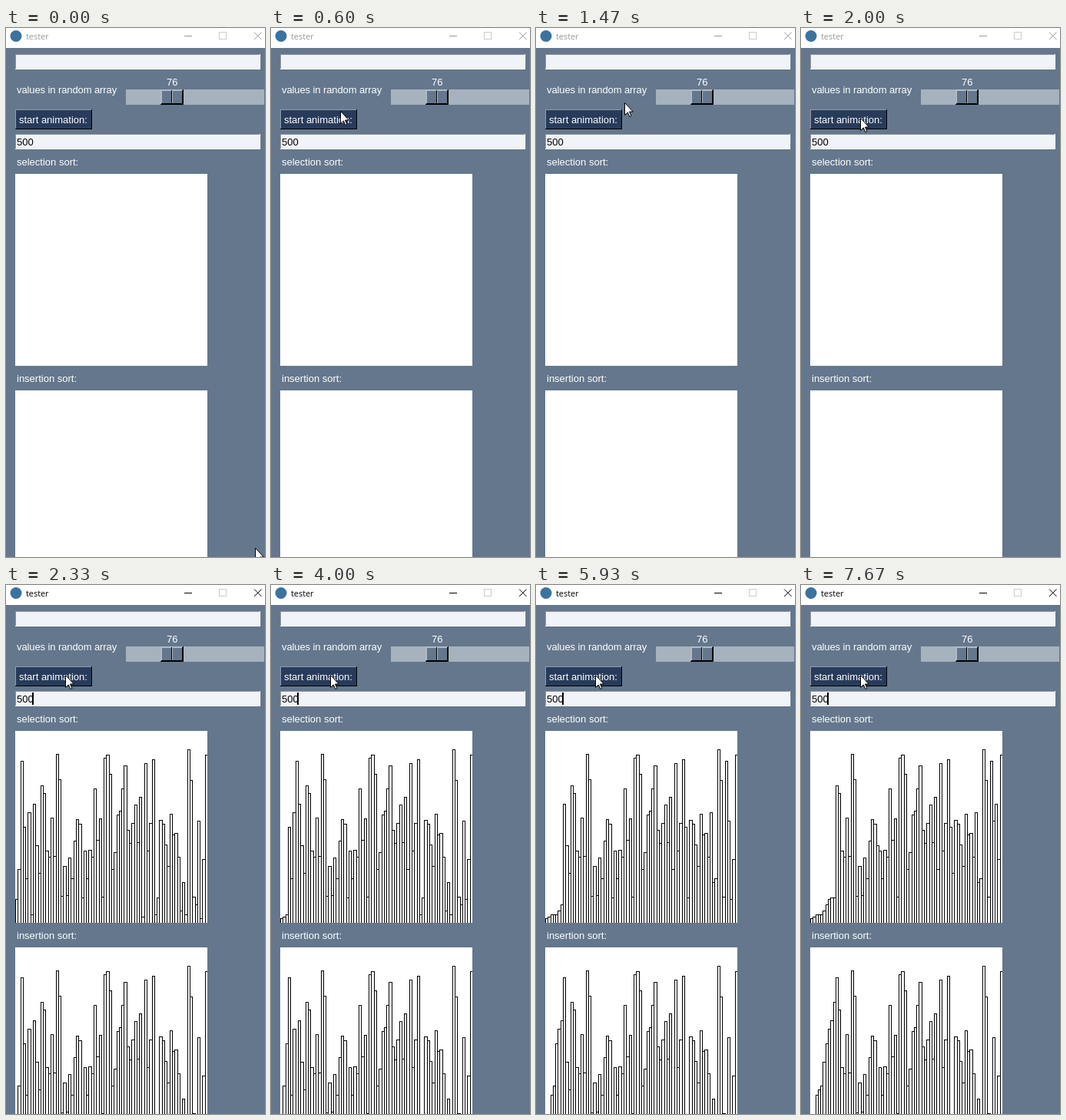
Write an HTML page that moves like this. It is 337x689 px and loops after 8 s.

```html
<!DOCTYPE html>
<html lang="en">
<head>
<meta charset="utf-8">
<title>tester</title>
<style>
  html, body { margin: 0; width: 100%; height: 100%; overflow: hidden; background: #64778d; }
  svg { display: block; }
  text { font: 13px "Liberation Sans", Arial, sans-serif; fill: #fff; white-space: pre; }
  .title { font: 10.9px "Open Sans", "Noto Sans", sans-serif; fill: currentColor; }
  .line { fill: none; stroke: currentColor; }
  .bars { fill: none; stroke: #000; }
  .crisp { shape-rendering: crispEdges; }
</style>
</head>
<body>
<svg id="stage" width="337" height="689" viewBox="0 0 337 689">
  <rect width="337" height="689" fill="#64778d"/>
  <rect width="337" height="26" fill="#fff"/>
  <circle cx="13" cy="10.5" r="7.5" fill="#3b73a0"/>
  <g id="bar">
    <text class="title" x="26" y="15">tester</text>
    <path class="line crisp" d="M232 10.5H242"/>
    <path class="line" d="M323 5.5L332.5 15M332.5 5.5L323 15"/>
  </g>
  <rect class="crisp" x="277.5" y="5.5" width="9" height="9" fill="none" stroke="#ccc"/>

  <g id="widgets" class="crisp"></g>

  <text x="14" y="85" letter-spacing="-0.1">values in random array</text>
  <text x="209" y="75">76</text>
  <text x="17" y="124">start animation:</text>
  <text x="14" y="153" style="fill:#000">500</text>
  <text x="14" y="179">selection sort:</text>
  <text x="14" y="461">insertion sort:</text>
  <rect id="caret" class="crisp" x="34" y="140" width="2" height="16"/>

  <svg x="12" y="190" width="250" height="250">
    <rect width="250" height="250" fill="#fff"/>
    <path id="selection" class="bars crisp"/>
  </svg>
  <svg x="12" y="472" width="250" height="250">
    <rect width="250" height="250" fill="#fff"/>
    <path id="insertion" class="bars crisp"/>
  </svg>

  <path id="cursor" d="M.5 .5V16.5L4.3 12.9L6.8 18.5L8.9 17.6L6.5 12H11.3Z" fill="#fff" stroke="#000"/>
</svg>
<script>
const LOOP = 8000, TICK = 200 / 3, FLOOR = 440, SIZE = 250;
const $ = id => document.getElementById(id);

// Top edge of each bar before sorting
const tops = [
  409, 370, 229, 315, 382, 296, 429, 285, 339, 375, 261, 271, 346, 354, 303, 353, 220, 253, 405,
  366, 404, 355, 382, 333, 305, 311, 407, 346, 382, 345, 354, 265, 332, 304, 406, 225, 221, 246,
  370, 348, 299, 294, 265, 235, 319, 336, 310, 286, 335, 276, 432, 232, 346, 310, 227, 429, 407,
  306, 311, 338, 366, 298, 325, 323, 354, 424, 387, 429, 214, 254, 406, 416, 307, 434, 357, 221
];
const activeAt = 2200, barsAt = 2330;
const sortTimes = [2870, 3330, 3870, 4400, 4870, 5470, 5930, 6470, 7000, 7530];
const blinkTimes = [2200, 2870, 3130, 3730, 4000, 4670, 4930, 5530, 5870, 6470, 6730, 7330, 7670];

// Pointer path: time, x, y
const path = [
  [0, 324, 677], [133, 324, 677], [200, 322, 650], [333, 270, 420], [467, 170, 205],
  [600, 90, 108], [667, 81, 97], [733, 84, 92], [867, 140, 98], [1000, 198, 108],
  [1067, 220, 92], [1133, 233, 80], [1267, 233, 80], [1333, 215, 82], [1467, 115, 97],
  [1600, 96, 105], [1800, 83, 113], [2000, 77, 117], [LOOP, 77, 117]
];

// Static widgets
function box(x, y, w, h, fill, lit, shade) {
  const rect = (x, y, w, h, c) =>
    `<rect x="${x}" y="${y}" width="${w}" height="${h}" fill="${c}"/>`;
  let s = rect(x, y, w, h, fill);
  if (lit) {
    s += rect(x, y, w, 1, lit) + rect(x, y, 1, h, lit) +
         rect(x, y + h - 1, w, 1, shade) + rect(x + w - 1, y, 1, h, shade);
  }
  return s;
}
const face = ["#64778d", "#b1bbc6", "#000"];
$("widgets").innerHTML =
  box(12, 34, 319, 20, "#f0f3f7", "#909294", "#fff") +
  box(12, 138, 319, 20, "#f0f3f7", "#909294", "#fff") +
  box(156, 80, 180, 20, "#a6b2be") +
  box(201, 80, 30, 20, ...face) +
  box(202, 81, 14, 18, ...face) +
  box(216, 81, 14, 18, ...face) +
  box(12, 106, 100, 26, "#283b5b", "#939dad", "#000");

function selectionSort(steps) {
  const a = tops.slice();
  for (let i = 0; i < steps; i++) {
    let low = i;
    for (let j = i + 1; j < a.length; j++) if (a[j] > a[low]) low = j;
    [a[i], a[low]] = [a[low], a[i]];
  }
  return a;
}

function insertionSort(steps) {
  const head = tops.slice(0, steps + 1).sort((p, q) => q - p);
  return head.concat(tops.slice(steps + 1));
}

function outline(a) {
  const edge = i => Math.round(i * SIZE / a.length - 0.01) + 0.5;
  return a.map((top, i) =>
    `M${edge(i)} ${SIZE + 1}V${top - FLOOR + SIZE + 0.5}H${edge(i + 1)}V${SIZE + 1}`).join("");
}

function pointer(t) {
  const now = Math.floor((t + 4) / TICK) * TICK;
  let k = 1;
  while (k < path.length - 1 && path[k][0] < now) k++;
  const [t0, x0, y0] = path[k - 1], [t1, x1, y1] = path[k];
  const p = Math.min(1, Math.max(0, (now - t0) / (t1 - t0)));
  return [Math.round(x0 + (x1 - x0) * p), Math.round(y0 + (y1 - y0) * p)];
}

const passed = (times, t) => times.filter(v => v <= t).length;
let shown = null;

function draw(t) {
  $("bar").style.color = t < activeAt ? "#999" : "#000";
  $("caret").style.display = passed(blinkTimes, t) % 2 ? "" : "none";
  $("cursor").setAttribute("transform", `translate(${pointer(t)})`);
  const steps = t < barsAt ? -1 : passed(sortTimes, t);
  if (steps === shown) return;
  shown = steps;
  $("selection").setAttribute("d", steps < 0 ? "" : outline(selectionSort(steps)));
  $("insertion").setAttribute("d", steps < 0 ? "" : outline(insertionSort(steps)));
}

const start = performance.now();
function frame() {
  draw((performance.now() - start) % LOOP);
  requestAnimationFrame(frame);
}
frame();
</script>
</body>
</html>
```
